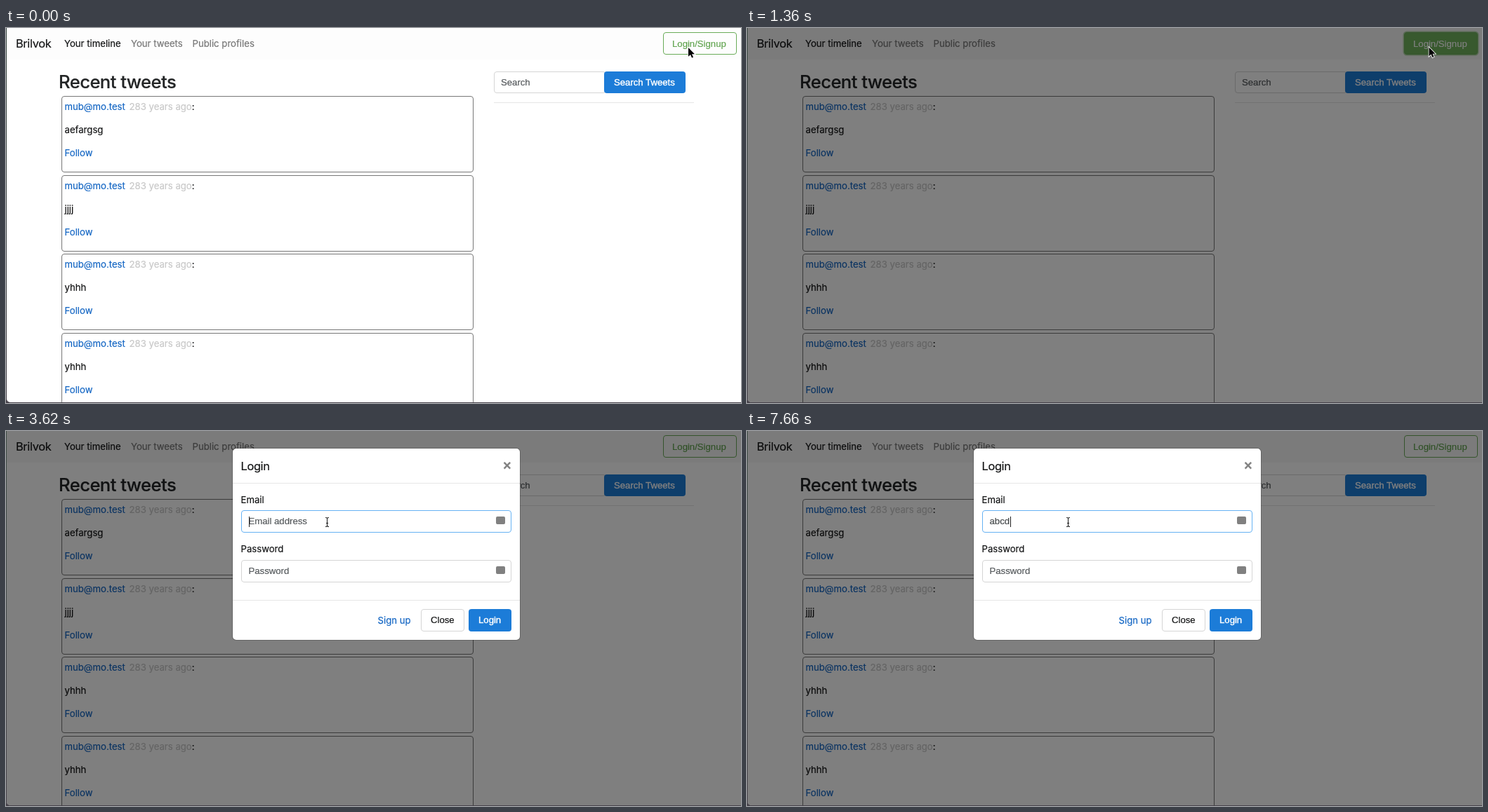
Recreate the animation shown at these times as an HTML page. Size 1047 by 535 pixels, loop 8000 ms.

```html
<!DOCTYPE html>
<html lang="en">
<head>
<meta charset="utf-8">
<title>Login dialog</title>
<style>
  html, body { margin: 0; width: 100%; height: 100%; overflow: hidden; }
  body { position: relative; background: linear-gradient(#3c4a44, #46424a); font: 13.16px/20px Inter, sans-serif; font-optical-sizing: none; color: #151617; -webkit-text-stroke-width: .2px; }
  div, span, svg { position: absolute; box-sizing: border-box; white-space: pre; }
  #window { left: 1px; top: 0; width: 1046px; height: 534px; background: #fff; border-radius: 0 0 0 5px; overflow: hidden; }
  #page, #modal { left: -1px; top: 0; width: 1047px; height: 535px; }
  #shade { inset: 0; background: #000; }
  .large { font-size: 16.4px; letter-spacing: -.35px; }
  .heading { font-size: 25.6px; font-weight: 500; letter-spacing: -.55px; color: #232526; }
  .muted { color: #777; }
  .link { color: #1567c4; }
  .date { color: #c8c8c8; }
  .date b { font-weight: 400; color: #151617; }
  .control { font-family: "Liberation Sans", Arial, sans-serif; }
  .hint { color: #55595c; }
  .white { color: #fff; -webkit-text-stroke-width: .4px; }
  .close { font: bold 20px/20px "Liberation Sans", Arial, sans-serif; color: #808080; }
  .post { border: 1px solid #777; border-radius: 4px; }
  .input { border: 1px solid #d5d5d5; border-radius: 4px; background: #fff; }
  .primary { background: #1c7cd8; border-radius: 4px; }
  .green { border: 1px solid #6aac58; border-radius: 4px; }
  .panel { background: #fff; border-radius: 5px; box-shadow: 0 0 0 1px rgba(0,0,0,.2); }
  .rule { background: #e6e6e6; }
  .icon { background: #808080; border-radius: 2px; }
  .caret { background: #222; }
</style>
</head>
<body>
<div id="window">
  <div id="page"></div>
  <div id="shade"></div>
  <div id="modal"></div>
</div>
<svg id="arrow" width="14" height="20" overflow="visible">
  <path d="M0 0V12.8L3 10L5 14.6L7 13.7L5 9.2H9Z" stroke="#fff" stroke-width="1.6" paint-order="stroke"/>
</svg>
<svg id="beam" width="8" height="16" overflow="visible">
  <path d="M-2.5 .5Q0 .5 0 2Q0 .5 2.5 .5M0 2V12M-2.5 13.5Q0 13.5 0 12Q0 13.5 2.5 13.5M-1.5 8.5H1.5" fill="none" stroke="#222" stroke-width="1.1"/>
</svg>
<script>
const $ = id => document.getElementById(id);
const box = (x, y, w, h, cls, id = '') =>
  `<div id="${id}" class="${cls}" style="left:${x}px;top:${y}px;width:${w}px;height:${h}px"></div>`;
// y is the middle of the text line
const text = (x, y, str, cls = '', id = '') =>
  `<span id="${id}" class="${cls}" style="left:${x}px;top:${y - 10}px">${str}</span>`;

const posts = ['aefargsg', 'jjjj', 'yhhh', 'yhhh'].map((message, i) => {
  const y = Math.round(97 + 112.6 * i);
  return box(79, y, 587, 109, 'post') +
    text(83.5, y + 15, 'mub@mo.test', 'link') +
    text(175.5, y + 15, '283 years ago<b>:</b>', 'date') +
    text(83.5, y + 48, message) +
    text(83.5, y + 81, 'Follow', 'link');
});

$('page').innerHTML =
  box(0, 0, 1047, 45, '', 'nav') +
  text(14, 22, 'Brilvok', 'large') +
  text(83, 22, 'Your timeline') +
  text(178, 22, 'Your tweets', 'muted') +
  text(265.5, 22, 'Public profiles', 'muted') +
  box(936, 6, 105, 32, 'green', 'signup') +
  text(949, 22.5, 'Login/Signup', 'control', 'signupText') +
  text(75, 76.5, 'Recent tweets', 'heading') +
  posts.join('') +
  box(695, 62, 160, 31, 'input') +
  text(705, 77.5, 'Search', 'control hint') +
  box(852, 62, 116, 31, 'primary') +
  text(866, 77.5, 'Search Tweets', 'control white') +
  box(695, 106, 285, 1, 'rule');

const field = (y, label, hint, id) =>
  text(334.5, y - 31.5, label) +
  box(335, y - 16, 385, 32, 'input', id) +
  text(345.5, y, hint, 'control hint', id + 'Text') +
  box(698, y - 7, 13, 11, 'icon');

$('modal').innerHTML =
  box(323, 25, 409, 273, 'panel') +
  text(334.5, 49.5, 'Login', 'large') +
  text(708, 49, '×', 'close') +
  box(323, 74, 409, 1, 'rule') +
  field(129, 'Email', '', 'email') +
  field(199.5, 'Password', 'Password', 'password') +
  box(346, 122, 1, 15, 'caret', 'caret') +
  box(323, 241, 409, 1, 'rule') +
  text(529.5, 270, 'Sign up', 'link') +
  box(591, 254, 62, 32, 'input') +
  text(605, 269.5, 'Close', 'control') +
  box(659, 254, 61, 32, 'primary') +
  text(673, 269.5, 'Login', 'control white');

const rules = document.querySelectorAll('#modal .rule');
const blinks = [3180, 3620, 4220, 4670, 5120, 5560, 6160, 6610];
const keys = [7210, 7360, 7510, 7660];
const passed = (times, t) => times.filter(at => t >= at).length;

function place(node, x, y, visible) {
  node.style.transform = `translate(${x}px,${y}px)`;
  node.style.visibility = visible ? 'visible' : 'hidden';
}

function draw() {
  const t = performance.now() % 8000;

  $('nav').style.background = t < 1210 ? '#fdfdfd' : '#f7f7f7';
  $('shade').style.opacity = t < 1210 ? 0 : t < 1360 ? .11 : .5;

  const fill = t < 320 || t >= 2130 ? 0 : t < 1840 ? 1 : .4;
  const signup = $('signup').style;
  signup.backgroundColor = `rgba(113,180,93,${fill})`;
  signup.boxShadow = t >= 1210 && t < 2130 ? '0 0 0 1.5px rgba(113,180,93,.5)' : 'none';
  $('signupText').style.color = fill ? '#fff' : '#62a450';

  place($('modal'), 0, t < 1840 ? -8 : 0, t >= 1570);
  for (const rule of rules) rule.style.opacity = t < 1840 ? 0 : 1;

  const typed = passed(keys, t);
  const entry = $('emailText');
  entry.textContent = typed ? 'abcd'.slice(0, typed) : 'Email address';
  entry.style.color = typed ? '#464a4c' : '';
  $('email').style.borderColor = t < 2730 ? '' : t < 2880 ? '#93c9f7' : '#66b2f3';
  place($('caret'), typed ? entry.offsetWidth : 0, 0,
    t >= 2730 && (typed || passed(blinks, t) % 2 === 0));

  const [x, y] = t < 140 ? [972, 28] : t < 1840 ? [971.5, 27.5] : [690, 88];
  place($('arrow'), x, y, t < 2130);
  place($('beam'), t < 2280 ? 461 : 457.5, 123, t >= 2130);
  requestAnimationFrame(draw);
}
draw();
</script>
</body>
</html>
```
